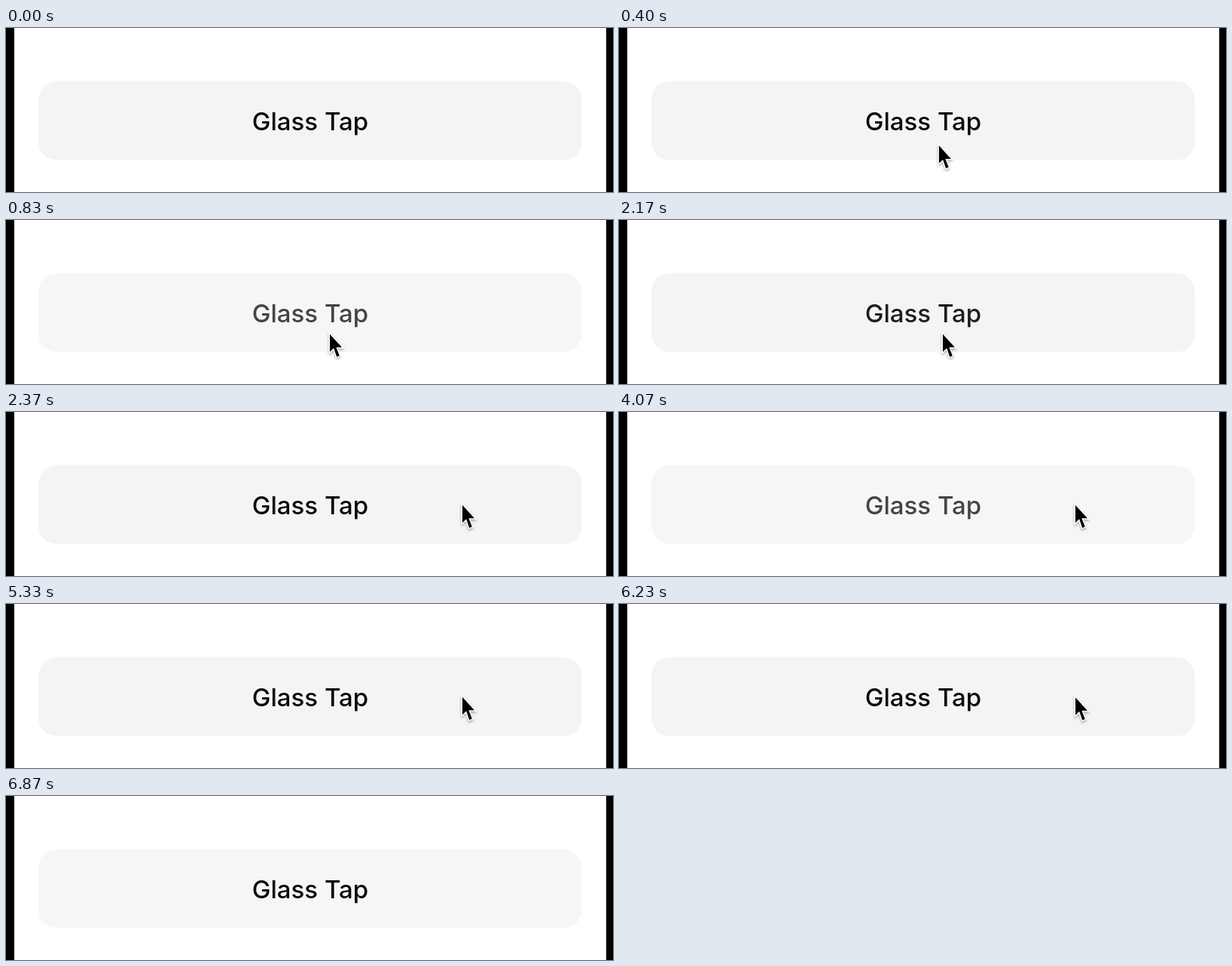
An HTML page that plays this animation: 806x218 px, repeating every 7970 ms.

```html
<!DOCTYPE html>
<html lang="en">
<head>
<meta charset="utf-8">
<title>Glass Tap</title>
<style>
  html, body { margin: 0; width: 100%; height: 100%; overflow: hidden; background: #fff; }
  svg { display: block; width: 806px; height: 218px; }
  text { font: 500 33px Inter, sans-serif; text-anchor: middle; fill: #0a0a0a; }
  #cursor { filter: drop-shadow(0 2px 1.5px rgba(0, 0, 0, .3)); }
</style>
</head>
<body>
<svg viewBox="0 0 806 218">
  <path d="M0 0H11V218H0ZM797 0H806V218H797Z"/>
  <g id="button">
    <rect id="face" x="43" y="71" width="721.5" height="104.5" rx="24"/>
    <text x="404" y="136.3">Glass Tap</text>
  </g>
  <path id="cursor" d="M0 0V23.5L5.2 18.6L9.2 30.2L12.8 28.8L8.4 17.6H16Z"
    stroke="#fff" stroke-width="3" paint-order="stroke"/>
</svg>
<script>
const LOOP = 7970, FADE = 280, PRESSED = 0.76;
const [button, face, cursor] = ['button', 'face', 'cursor'].map(id => document.getElementById(id));

// [press, release] times in ms
const taps = [[830, 1100], [1730, 2050], [2730, 2980], [3470, 3750],
              [4070, 4410], [4770, 5050], [5600, 5740]];

const easeOut = p => 1 - (1 - p) ** 2;
const easeInOut = p => p * p * (3 - 2 * p);
const easeIn = p => p * p;

// start, end, from, to, easing
const moves = [
  [200, 470, [352, 222], [430, 151.7], easeOut],
  [2235, 2370, [430, 151.7], [606, 123.7], easeInOut],
  [6200, 6640, [606, 123.7], [619, 224], easeIn],
];

const progress = (t, start, end) => Math.min(1, Math.max(0, (t - start) / (end - start)));

function opacityAt(t) {
  const tap = taps.findLast(([press]) => t >= press);
  return tap ? PRESSED + (1 - PRESSED) * easeOut(progress(t, tap[1], tap[1] + FADE)) : 1;
}

function cursorAt(t) {
  const [start, end, from, to, ease] = moves.findLast(m => t >= m[0]) || moves[0];
  const p = ease(progress(t, start, end));
  return from.map((v, i) => v + (to[i] - v) * p);
}

function draw(now) {
  const t = now % LOOP;
  button.setAttribute('opacity', opacityAt(t));
  face.setAttribute('fill', t < 6640 ? '#f4f4f4' : '#f6f6f6');
  cursor.setAttribute('transform', `translate(${cursorAt(t)})`);
  requestAnimationFrame(() => draw(performance.now()));
}
draw(performance.now());
</script>
</body>
</html>
```
